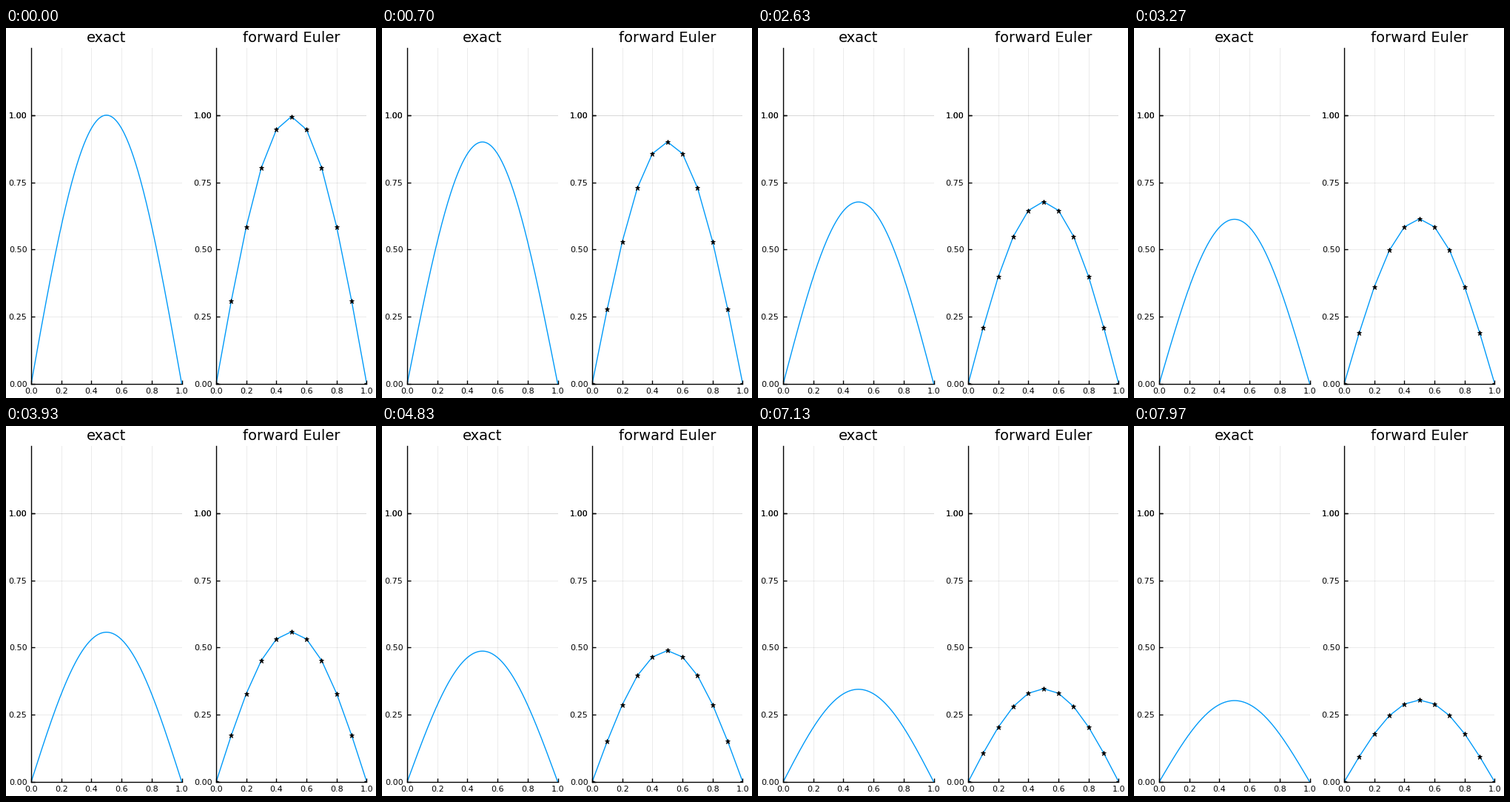
A matplotlib script for the animation above (8000 ms loop, 500x500 px).

```python
import numpy as np
import matplotlib.pyplot as plt
from matplotlib.animation import FuncAnimation

SIZE, DPI = 500, 100
FRAMES, LOOP_MS = 240, 8000
PX = 72 / DPI              # points per pixel
BLUE = "#009AF9"
DECAY = 0.005              # pi^2 * dt of the heat equation
DX = 0.1

plt.rcParams["font.family"] = "DejaVu Sans"
fig = plt.figure(figsize=(SIZE / DPI, SIZE / DPI), dpi=DPI, facecolor="white")

XTICKS = np.linspace(0, 1, 6)
YTICKS = [0, 0.25, 0.5, 0.75, 1, 1]   # the tick at 1 is drawn twice


def panel(left, title):
    """Axes placed in pixels, with a light grid and inward ticks."""
    width, bottom, height = 203.5, 19, 454
    ax = fig.add_axes([left / SIZE, bottom / SIZE, width / SIZE, height / SIZE])
    ax.set(xlim=(0, 1), ylim=(0, 1.25))
    ax.patch.set_visible(False)
    ax.spines[["top", "right"]].set_visible(False)
    ax.spines[["left", "bottom"]].set_linewidth(1.39 * PX)

    grid = dict(color="black", alpha=0.08, lw=PX, zorder=0.5)
    for x in XTICKS[1:-1]:
        ax.axvline(x, **grid)
    for y in YTICKS[1:]:
        ax.axhline(y, **grid)

    ax.set_xticks(XTICKS, [f"{x:.1f}" for x in XTICKS])
    ax.set_yticks(YTICKS, [f"{y:.2f}" for y in YTICKS])
    ax.tick_params(direction="in", length=5 * PX, width=1.39 * PX,
                   labelsize=8, pad=5.5 * PX)
    fig.text((left + width / 2) / SIZE, 1 - 19 / SIZE, title,
             size=14, ha="center", va="baseline")
    return ax


exact_ax = panel(34, "exact")
euler_ax = panel(284, "forward Euler")

x_fine = np.linspace(0, 1, 201)
x_grid = np.linspace(0, 1, 11)
sine_fine = np.sin(np.pi * x_fine)
sine_grid = np.sin(np.pi * x_grid)

# The sine is an eigenvector of the discrete Laplacian,
# so one Euler step only multiplies it by a constant.
eigenvalue = 4 / DX**2 * np.sin(np.pi * DX / 2) ** 2
step_factor = 1 - DECAY / np.pi**2 * eigenvalue

line_style = dict(color=BLUE, lw=1.39 * PX, solid_joinstyle="round")
exact_line, = exact_ax.plot(x_fine, sine_fine, **line_style)
euler_line, = euler_ax.plot(x_grid, sine_grid, **line_style)
stars, = euler_ax.plot(x_grid, sine_grid, "*", color="black",
                       ms=7 * PX, mew=0.9 * PX, zorder=3)
stars.set_snap(False)


def update(k):
    exact_line.set_ydata(np.exp(-DECAY * k) * sine_fine)
    u = step_factor ** max(k, 1) * sine_grid
    euler_line.set_ydata(u)
    stars.set_ydata(u)
    return exact_line, euler_line, stars


anim = FuncAnimation(fig, update, frames=FRAMES, interval=LOOP_MS / FRAMES,
                     repeat=True, repeat_delay=0)
plt.show()
```
